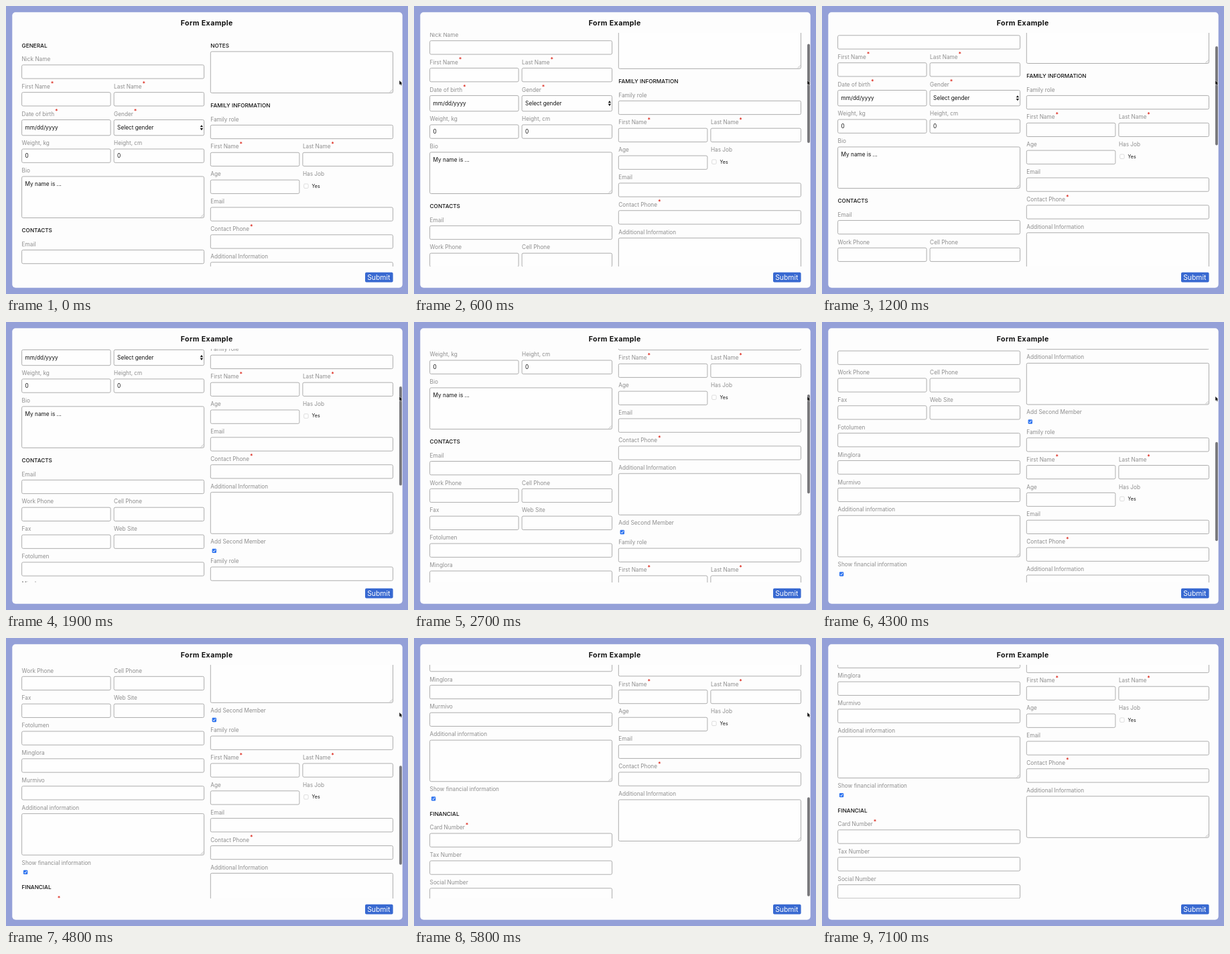
Recreate the animation shown at these times as an HTML page with a canvas. Size 600 px wide and 429 px high, loop 7.7 s.

```html
<!DOCTYPE html>
<html lang="en">
<head>
<meta charset="utf-8">
<title>Form Example</title>
<style>
  html, body { margin: 0; width: 100%; height: 100%; overflow: hidden; background: #94a0d8; }
  canvas { display: block; width: 600px; height: 429px; }
</style>
</head>
<body>
<canvas id="stage"></canvas>
<script>
const W = 600, H = 429, LOOP = 7700, STEP = 100;
const VIEW = { top: 40, bottom: 388 };
const FAMILY = 'Inter, "Open Sans", sans-serif';
const PITCH = 40.85;

const canvas = document.getElementById('stage');
const ctx = canvas.getContext('2d');
const dpr = window.devicePixelRatio || 1;
canvas.width = W * dpr;
canvas.height = H * dpr;

// A trailing * marks a required field; "=" introduces a value.
const head = title => ({ kind: 'head', title });
const row = (...fields) => ({ kind: 'row', fields });
const area = (label, value = '') => ({ kind: 'area', label, value });
const check = label => ({ kind: 'check', label });

const person = [
  row('Family role'),
  row('First Name*', 'Last Name*'),
  row('Age', 'Has Job=?'),
  row('Email'),
  row('Contact Phone*'),
  area('Additional Information')
];

const left = [
  head('GENERAL'),
  row('Nick Name'),
  row('First Name*', 'Last Name*'),
  { ...row('Date of birth*=mm/dd/yyyy', 'Gender*=Select gender'), tall: true },
  row('Weight, kg=0', 'Height, cm=0'),
  area('Bio', 'My name is ...'),
  head('CONTACTS'),
  row('Email'),
  row('Work Phone', 'Cell Phone'),
  row('Fax', 'Web Site'),
  row('Fotolumen'),
  row('Minglora'),
  row('Murmivo'),
  area('Additional information'),
  check('Show financial information'),
  head('FINANCIAL'),
  row('Card Number*'),
  row('Tax Number'),
  row('Social Number')
];

const right = [
  head('NOTES'),
  area(''),
  head('FAMILY INFORMATION'),
  ...person,
  check('Add Second Member'),
  ...person
];

// Each swipe of the scroll: start, end, offset before, offset after.
const swipes = [
  [0, 1200, 0, 44],
  [1200, 2800, 44, 156],
  [2900, 3800, 156, 236.5],
  [3900, 4800, 236.5, 347],
  [4900, 6200, 347, 461.7]
];

function scrollAt(t) {
  let pos = 0;
  for (const [start, end, from, to] of swipes) {
    if (t < start) break;
    const u = Math.min(1, (t - start) / (end - start));
    pos = from + (to - from) * (1 - Math.pow(1 - Math.pow(u, 1.2), 3));
  }
  return pos;
}

function text(str, x, y, size, color, weight = 400) {
  ctx.font = `${weight} ${size}px ${FAMILY}`;
  ctx.fillStyle = color;
  ctx.fillText(str, x, y);
}

function roundRect(x, y, w, h, r) {
  ctx.beginPath();
  ctx.roundRect(x, y, w, h, r);
}

function poly(points, color) {
  ctx.beginPath();
  points.forEach(([x, y]) => ctx.lineTo(x, y));
  ctx.closePath();
  ctx.fillStyle = color;
  ctx.fill();
}

function line(color, width, ...points) {
  ctx.beginPath();
  points.forEach(([x, y], i) => i ? ctx.lineTo(x, y) : ctx.moveTo(x, y));
  ctx.strokeStyle = color;
  ctx.lineWidth = width;
  ctx.stroke();
}

function box(x, y, w, h) {
  roundRect(x, y, w, h, 2);
  ctx.fillStyle = '#fefefe';
  ctx.fill();
  ctx.strokeStyle = '#adadad';
  ctx.lineWidth = 1;
  ctx.stroke();
}

function label(str, x, y) {
  const required = str.endsWith('*');
  const name = required ? str.slice(0, -1) : str;
  text(name, x, y + 3, 8.25, '#8e8e8e');
  if (required) text('*', x + ctx.measureText(name).width + 0.9, y - 0.5, 8.5, '#dc2a1e', 600);
}

function tick(x, y, on) {
  roundRect(x - 3.2, y - 3.2, 6.4, 6.4, 1.3);
  ctx.fillStyle = on ? '#2f74ef' : '#fff';
  ctx.fill();
  if (on) {
    line('#fff', 1, [x - 1.7, y + 0.1], [x - 0.5, y + 1.6], [x + 1.8, y - 1.7]);
  } else {
    ctx.strokeStyle = '#cfcfcf';
    ctx.lineWidth = 0.7;
    ctx.stroke();
  }
}

function field(spec, x, y, w, h) {
  const [name, value] = spec.split('=');
  label(name, x, y);
  if (value === '?') {
    tick(x + 5, y + 17.9, false);
    text('Yes', x + 13.7, y + 20.3, 7, '#111');
    return;
  }
  const top = y + 8.8;
  box(x, top, w, h);
  if (!value) return;
  const mid = top + h / 2;
  text(value, x + 5, mid + 3, 8.25, '#111');
  if (value.startsWith('Select')) {
    const ax = x + w - 3.7;
    poly([[ax - 2.2, mid - 0.8], [ax, mid - 4], [ax + 2.2, mid - 0.8]], '#111');
    poly([[ax - 2.2, mid + 0.8], [ax, mid + 4], [ax + 2.2, mid + 0.8]], '#111');
  }
}

function column(items, x, w, split) {
  let y = 59;
  items.forEach((item, i) => {
    if (item.kind === 'head') {
      if (i) y += 7.2;
      text(item.title, x, y + 3, 8.2, '#111', 500);
      // An unlabelled area sits straight under its heading.
      if (items[i + 1].label !== '') y += i ? 20.4 : 20;
    } else if (item.kind === 'row') {
      const [a, b] = item.fields;
      const h = item.tall ? 23.3 : 20.3;
      field(a, x, y, b ? split - 5 : w, h);
      if (b) field(b, x + split, y, w - split, h);
      y += item.tall ? 43.5 : PITCH;
    } else if (item.kind === 'area') {
      const top = y + 8.9, r = x + w, b = top + 61.6;
      label(item.label, x, y);
      box(x, top, w, 61.6);
      text(item.value, x + 5, top + 13.7, 8.25, '#111');
      line('#999', 0.6, [r - 5, b - 1], [r - 1, b - 5]);
      line('#999', 0.6, [r - 2.7, b - 1], [r - 1, b - 2.7]);
      y += 82;
    } else {
      label(item.label, x, y);
      tick(x + 5.5, y + 14.1, true);
      y += 29.4;
    }
  });
}

function pointer(x, y) {
  const shape = [[0, 0], [0, 6.2], [1.4, 5], [2.4, 7.2], [3.4, 6.8], [2.5, 4.6], [4.3, 4.4]];
  const pts = shape.map(([dx, dy]) => [x + dx, y + dy]);
  line('#fff', 1, ...pts, pts[0]);
  poly(pts, '#111');
}

function draw(time) {
  const t = Math.floor((time % LOOP) / STEP) * STEP;
  const pos = scrollAt(t);

  ctx.setTransform(dpr, 0, 0, dpr, 0, 0);
  ctx.fillStyle = '#94a0d8';
  ctx.fillRect(0, 0, W, H);
  roundRect(9.3, 9.3, 582.4, 410.4, 5);
  ctx.fillStyle = '#fdfdfd';
  ctx.fill();

  ctx.letterSpacing = '0.4px';
  text('Form Example', 260.8, 29.3, 10.6, '#111', 700);
  ctx.letterSpacing = '0px';

  ctx.save();
  ctx.beginPath();
  ctx.rect(9, VIEW.top, 582, VIEW.bottom - VIEW.top);
  ctx.clip();
  ctx.translate(0, -pos);
  column(left, 23.6, 272, 137.5);
  column(right, 305.3, 272.2, 137.6);
  ctx.restore();

  roundRect(536, 396.8, 41.6, 14.6, 2);
  ctx.fillStyle = '#3869d1';
  ctx.fill();
  text('Submit', 539.2, 408, 10.4, '#fff');

  if (t >= 100 && t < 7100) {
    ctx.globalAlpha = t < 6800 ? 1 : (7100 - t) / 400;
    roundRect(587, 41 + pos * 0.43, 3.9, 147.5, 2);
    ctx.fillStyle = '#78787c';
    ctx.fill();
    ctx.globalAlpha = 1;
  }
  if (t < 6800) pointer(587.2, 111);
}

const begin = performance.now();
function loop() {
  draw(performance.now() - begin);
  requestAnimationFrame(loop);
}
loop();
</script>
</body>
</html>
```
